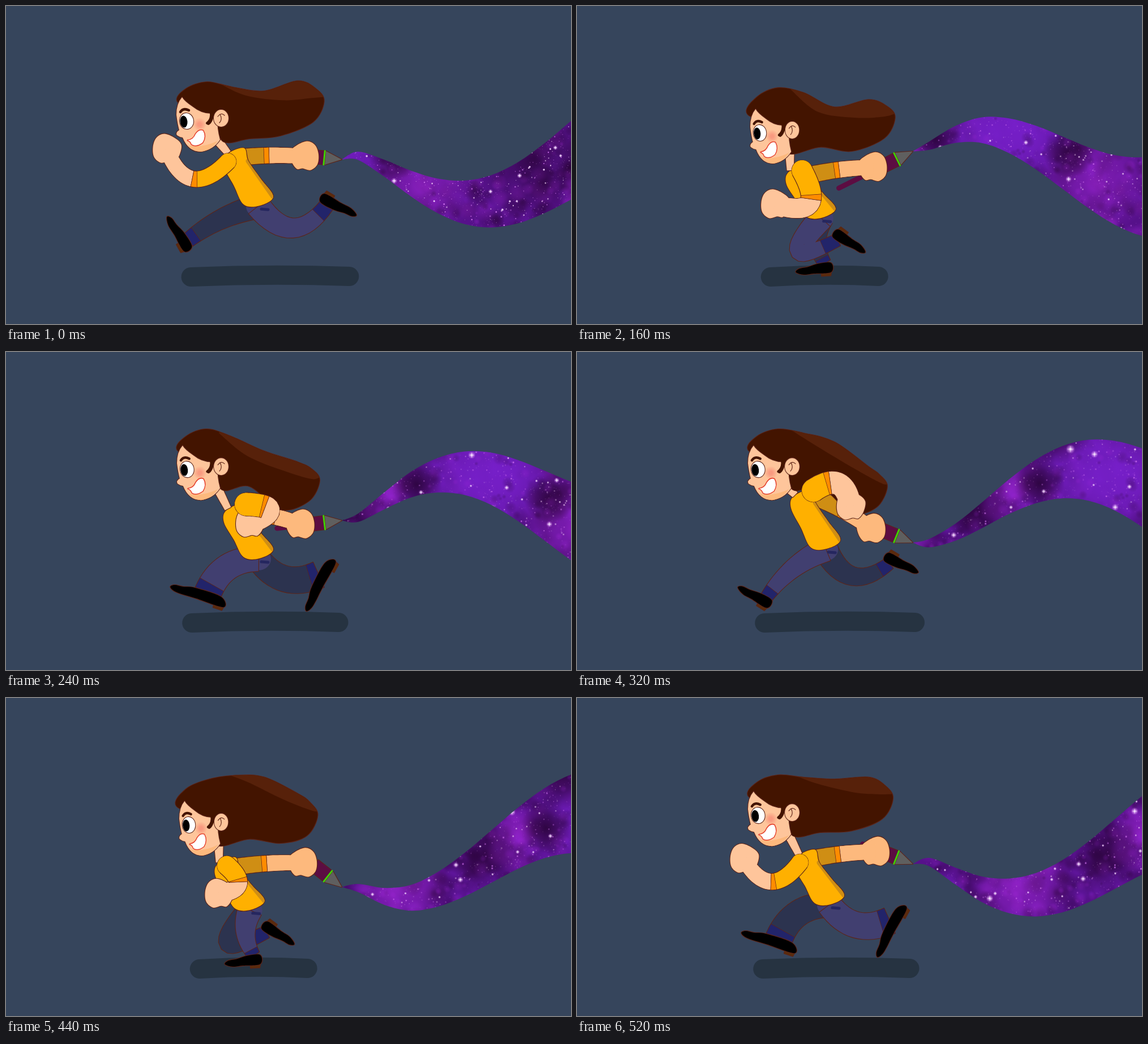
An HTML page with a canvas that plays this animation: 998 px wide and 561 px high, repeating every 560 ms.

```html
<!DOCTYPE html>
<html lang="en">
<head>
<meta charset="utf-8">
<title>Running with a galaxy pen</title>
<style>
html, body { margin: 0; width: 100%; height: 100%; overflow: hidden; background: #36455c; }
canvas { display: block; width: 100vw; height: 100vh; }
</style>
</head>
<body>
<canvas id="stage" width="998" height="561"></canvas>
<script>
const ctx = document.getElementById('stage').getContext('2d');
const STEP = 40, CYCLE = 14, STRIDE = CYCLE / 2, TAU = 2 * Math.PI;
const INK = '#5c2418', SKIN = '#fec59b', SKIN_DARK = '#fdb97d', SHIRT = '#ffb000',
  SHIRT_DARK = '#cf8e14', CUFF = '#ff8c00', HAIR = '#431400', SHINE = '#57210a',
  JEANS = '#413f70', JEANS_DARK = '#2c334f', HEM = '#22246a', HEEL = '#5a2c0c', PEN = '#5c0d42';

// Key poses of one leg: step, ankle x, ankle y, knee bend, foot angle in degrees.
const LEG_KEYS = [
  [0, 322, 413, 8, 241], [2, 348, 452, 12, 184], [4, 438, 454, 11, 177], [6, 552, 393, 22, 119],
  [7, 566, 352, 39, 31], [9, 537, 394, 33, 30], [11, 460, 413, 65, 37], [13, 357, 424, 18, 199],
  [14, 322, 413, 8, 241]];

const mix = (a, b, f) => a + (b - a) * f;
const wave = (k, peak, period = CYCLE) => Math.cos(TAU * (k - peak) / period);

// Catmull-Rom spline through flat x/y pairs.
function spline(pts, closed = true, path = new Path2D(), join = false) {
  const n = pts.length / 2;
  const at = i => {
    i = closed ? (i + n) % n : Math.max(0, Math.min(n - 1, i));
    return [pts[2 * i], pts[2 * i + 1]];
  };
  path[join ? 'lineTo' : 'moveTo'](...at(0));
  for (let i = 0; i < (closed ? n : n - 1); i++) {
    const [a, b, c, d] = [at(i - 1), at(i), at(i + 1), at(i + 2)];
    path.bezierCurveTo(b[0] + (c[0] - a[0]) / 6, b[1] + (c[1] - a[1]) / 6,
      c[0] - (d[0] - b[0]) / 6, c[1] - (d[1] - b[1]) / 6, c[0], c[1]);
  }
  return path;
}

function stroke(path, color, width) {
  ctx.strokeStyle = color;
  ctx.lineWidth = width;
  ctx.stroke(path);
}
function paint(path, fill, line = 2.2) {
  if (line) stroke(path, INK, line);
  ctx.fillStyle = fill;
  ctx.fill(path);
}
function oval(x, y, rx, ry, angle = 0) {
  const path = new Path2D();
  path.ellipse(x, y, rx, ry, angle, 0, TAU);
  return path;
}
function within(path, drawInside) {
  ctx.save();
  ctx.clip(path);
  drawInside();
  ctx.restore();
}

// Joints of a limb that bows sideways by `bend` between its ends.
function limb(sx, sy, ex, ey, bend) {
  const dx = ex - sx, dy = ey - sy, f = bend / Math.hypot(dx, dy);
  return [sx, sy, (sx + ex) / 2 - dy * f, (sy + ey) / 2 + dx * f, ex, ey];
}

// Tapered band along a curve that passes through three joints.
function tube([sx, sy, mx, my, ex, ey], w0, w1, t0 = 0, t1 = 1) {
  const cx = 2 * mx - (sx + ex) / 2, cy = 2 * my - (sy + ey) / 2;
  const path = new Path2D(), back = [];
  for (let i = 0; i <= 16; i++) {
    const t = mix(t0, t1, i / 16);
    const x = mix(mix(sx, cx, t), mix(cx, ex, t), t), y = mix(mix(sy, cy, t), mix(cy, ey, t), t);
    const dx = mix(cx - sx, ex - cx, t), dy = mix(cy - sy, ey - cy, t);
    const r = mix(w0, w1, t) / 2 / (Math.hypot(dx, dy) || 1);
    path.lineTo(x - dy * r, y + dx * r);
    back.unshift([x + dy * r, y - dx * r]);
  }
  back.forEach(p => path.lineTo(...p));
  path.closePath();
  return path;
}

function makeGalaxy() {
  const sky = document.createElement('canvas');
  sky.width = 1020;
  sky.height = 440;
  const g = sky.getContext('2d');
  let seed = 11;
  const rnd = (a = 0, b = 1) => mix(a, b, (seed = seed * 16807 % 2147483647) / 2147483647);
  const glow = (rgb, x, y, r, alpha) => {
    const fade = g.createRadialGradient(x, y, 0, x, y, r);
    fade.addColorStop(0, `rgba(${rgb},${alpha})`);
    fade.addColorStop(.5, `rgba(${rgb},${alpha * .65})`);
    fade.addColorStop(1, `rgba(${rgb},0)`);
    g.fillStyle = fade;
    g.fillRect(x - r, y - r, 2 * r, 2 * r);
  };
  const VIOLET = '120,32,204', PINK = '165,40,220', DARK = '36,2,46';
  g.fillStyle = '#56118a';
  g.fillRect(0, 0, 1020, 440);
  for (let i = 0; i < 900; i++)
    glow([VIOLET, DARK, DARK, PINK][i % 4], rnd(0, 1020), rnd(100, 420), rnd(5, 24), .3);
  glow(VIOLET, 550, 220, 130, .9);
  glow(VIOLET, 610, 225, 90, .8);
  glow(PINK, 190, 340, 90, .6);
  glow(PINK, 400, 245, 50, .6);
  glow(PINK, 735, 310, 100, .5);
  glow(DARK, 451, 238, 45, .8);
  glow(DARK, 685, 262, 45, .8);
  glow(DARK, 345, 280, 60, .6);
  glow(DARK, 480, 140, 65, .8);
  glow(DARK, 940, 270, 110, .5);
  for (let i = 0; i < 350; i++)
    glow(i % 2 ? DARK : PINK, rnd(0, 1020), rnd(100, 420), rnd(3, 12), .22);
  for (let i = 0; i < 4200; i++) {
    const s = .6 + rnd() ** 4 * 2;
    g.fillStyle = `rgba(${rnd() < .4 ? '255,225,255' : '215,120,245'},${rnd(.3, .9)})`;
    g.fillRect(rnd(0, 1020), rnd(100, 420), s, s);
  }
  for (let i = 0; i < 130; i++) {
    const x = rnd(0, 1020), y = rnd(110, 410), r = 1 + rnd() ** 3 * 3;
    glow('235,170,255', x, y, r * 2.2, .8);
    g.fillStyle = '#f6e6ff';
    g.fillRect(x - r / 2, y - r / 2, r, r);
    g.fillRect(x - r * 1.4, y - .4, r * 2.8, .8);
    g.fillRect(x - .4, y - r * 1.4, .8, r * 2.8);
  }
  return sky;
}
const galaxy = makeGalaxy();

// The trail is a wave that runs to the right and widens behind the pen.
function drawTrail(k, tip) {
  const top = [...tip], bottom = [...tip];
  for (let x = 622; x < 1050; x += 47) {
    const swing = Math.min(68, 58 + (x - 622) / 8) * wave(k, 4.1 + (x - 700) / 47);
    top.push(x, 284 - .22 * (x - 620) - swing);
    bottom.unshift(x, 298 + .11 * (x - 620) - swing);
  }
  // Pairs were put in front of the tip, so the tip already ends the lower edge.
  const path = spline(top, false);
  spline(bottom, false, path, true);
  within(path, () => ctx.drawImage(galaxy, 45.7 * k, -.8 * k));
}

function drawLeg(k, hip, color) {
  const i = LEG_KEYS.findIndex(key => key[0] > k), a = LEG_KEYS[i - 1], b = LEG_KEYS[i];
  const [, x, y, bend, angle] = a.map((v, j) => mix(v, b[j], (k - a[0]) / (b[0] - a[0])));
  const smear = Math.max(0, wave(k, 6, STRIDE)) ** 4;
  const half = 11 + 13 * smear, heel = -10 - 24 * smear, toe = heel + 62 + 38 * smear;
  const joints = limb(hip.x, hip.y + 6, x, y, bend);
  paint(tube(joints, 43, half * 2), color);
  paint(tube(joints, 43, half * 2, .88), HEM, 1.4);

  ctx.save();
  ctx.translate(x, y);
  ctx.rotate(angle * Math.PI / 180);
  ctx.scale(1, -1);
  paint(new Path2D(`M${heel - 1} 12h18v10h-16z`), HEEL);
  paint(spline([-half, 0, half, 0, (half + toe) / 2, 5, toe - 6, 7, toe, 13, toe - 14, 18,
    (heel + toe) / 2, 17, heel, 16]), '#000');
  ctx.restore();
}

function drawArm(joints, cuff, width, flip, skin, sleeve) {
  const [sx, sy, , , x, y] = joints;
  const band = (t0, t1) => tube(joints, width, width - 3, t0, t1);
  const shoulder = oval(sx, sy, width / 2, width / 2);
  const fist = [-26, -8, -14, -20, 4, -27, 18, -20, 24, -4, 22, 14, 10, 24, -4, 21, -14, 22, -23, 10];
  paint(band(0, 1), skin);
  paint(spline(fist.map((v, i) => i % 2 ? y + v : x + v * flip)), skin);
  paint(band(cuff, 1), skin, 0);
  paint(shoulder, sleeve, 1.6);
  paint(band(0, cuff), sleeve, 1.6);
  paint(shoulder, sleeve, 0);
  paint(band(cuff - .07, cuff), CUFF, 1.4);
}

function drawPen([x, y], angle, tail) {
  ctx.save();
  ctx.translate(x, y);
  ctx.rotate(angle);
  stroke(new Path2D(`M-50 0H${-tail}`), PEN, 9);
  paint(new Path2D('M-31 -12H-62V12H-31Z'), PEN);
  paint(new Path2D('M0 0L-29 -12V12Z'), '#5f5f5f');
  stroke(new Path2D('M-31 -12V12'), '#3fd000', 3);
  ctx.restore();
}

function drawTorso(neck, hip) {
  const chest = [neck.x - 7, neck.y + 24], waist = [hip.x - 26, hip.y + 3];
  const back = [neck.x + 36, neck.y + 14], seat = [hip.x + 26, hip.y - 11];
  const torso = spline([
    neck.x - 3, neck.y + 3, neck.x + 28, neck.y - 9, ...back,
    mix(back[0], seat[0], .5), mix(back[1], seat[1], .5), ...seat, hip.x + 2, hip.y + 5,
    ...waist, mix(chest[0], waist[0], .5), mix(chest[1], waist[1], .5), ...chest]);
  paint(torso, SHIRT);
  within(torso, () => stroke(spline([...back, ...seat], false), SHIRT_DARK, 9));
}

// The hair streams back: each part follows the head a little later.
function drawHair(k, bob) {
  const crown = 145 + 8 * wave(k, 4), middle = 159 + 20 * wave(k, 4.5), end = 167 + 36 * wave(k, 7.6);
  const tipX = 556 - 9 * wave(k, 9), tipY = 202 + 36 * wave(k, 7.8);
  const hair = spline([
    304 - bob / 8, 170 + bob, 318, 146 + bob * .7, 355, 134 + bob * .5, 400, crown, 455, middle, 515, end,
    tipX - 14, (end + tipY) / 2 - 4, tipX, tipY, tipX - 19, tipY + 36, 485, 256 + 28 * wave(k, 7.5),
    430, 234 + bob * .7, 384 - bob * .45, 239 + bob, 362, 195 + bob]);
  paint(hair, HAIR);
  const shine = spline([376, crown - 7, 425, middle + 8, 490, (middle + end) / 2 + 25, 540, end + 30,
    tipX + 3, tipY - 8], false);
  shine.lineTo(620, 80);
  shine.lineTo(400, 80);
  within(hair, () => paint(shine, SHINE, 0));
}

function drawFace(bob) {
  ctx.save();
  ctx.translate(340 + bob / 8, bob);
  ctx.scale(1 - bob * .003, 1);
  ctx.translate(-340, 0);
  paint(new Path2D('M311 161Q301 172 301 192Q303 208 306 219Q299 223 302 228Q306 231 312 232Q322 257 344 257' +
    'Q366 254 378 236Q372 214 374 200L362 190Q345 190 330 178Q315 168 311 161Z'), SKIN);
  paint(new Path2D('M322 246Q346 251 374 238Q362 255 344 257Q330 256 322 246Z'), SKIN_DARK, 0);
  const blush = ctx.createRadialGradient(342, 209, 3, 342, 209, 12);
  blush.addColorStop(0, 'rgba(248,150,125,.9)');
  blush.addColorStop(1, 'rgba(248,150,125,0)');
  paint(oval(342, 209, 12, 12), blush, 0);
  paint(new Path2D('M368 185Q367 205 358 210Q349 208 356 203Q361 198 360 188Z'), HAIR, 0);
  paint(oval(380, 198, 13, 15), SKIN);
  stroke(new Path2D('M374 195Q380 187 386 193M378 191Q383 200 377 206'), INK, 1.2);
  stroke(new Path2D('M308 187Q313 179 323 184'), HAIR, 4.5);
  paint(oval(319, 203, 12, 14, -.15), '#fff');
  paint(oval(314, 204, 6.5, 10.5, -.1), '#000', 0);
  const mouth = new Path2D('M321 237Q331 236 335 226Q341 217 348 220Q354 230 347 241Q336 249 328 244Q326 238 321 237Z');
  stroke(mouth, '#e5402c', 3);
  paint(mouth, '#fff', 0);
  ctx.restore();
}

function draw(k) {
  const swing = wave(k, 0), bob = 11 * (1 - wave(k, 0, STRIDE));
  const lean = 10 * wave(k, 6.5, STRIDE), drop = wave(k, 4.5, STRIDE);
  const neck = { x: 383 + lean, y: 272 + 20 * drop };
  const hip = { x: 437 + lean, y: 356 + 14 * drop };
  const tip = [593, 295 - 51 * wave(k, 2.4)];

  ctx.fillStyle = '#36455c';
  ctx.fillRect(0, 0, 998, 561);
  ctx.lineCap = ctx.lineJoin = 'round';

  drawTrail(k, tip);
  const middle = 452 + 15 * wave(k, .3, STRIDE), reach = 117 + 23 * wave(k, .1, STRIDE);
  stroke(new Path2D(`M${middle - reach} 478Q${middle} 472 ${middle + reach} 477`), '#263341', 34);

  drawLeg(k, hip, JEANS_DARK);
  const farX = 524 + 4 * swing, farY = 288 - 24 * wave(k, .8);
  drawPen(tip, 1.2 * Math.atan2(tip[1] - farY, tip[0] - farX), 105 + 45 * wave(k, 3));
  drawArm(limb(neck.x + 32 - 14 * swing, neck.y + 8, farX, farY, -3), .46, 29, 1, SKIN_DARK, SHIRT_DARK);

  paint(oval(hip.x, hip.y + 6, 22, 20), JEANS, 0);
  drawLeg((k + STRIDE) % CYCLE, hip, JEANS);
  stroke(new Path2D(`M${hip.x + 5} ${hip.y + 11}l12 1`), '#25265f', 5);

  drawTorso(neck, hip);
  paint(tube(limb(373 + bob / 8, 236 + bob, neck.x, neck.y, 0), 16, 12), SKIN);
  drawHair(k, bob);
  drawFace(bob);

  const nearX = 372 - 98 * wave(k, .8) + 15 * wave(k, 1.5, STRIDE);
  const nearY = 303 + 45 * wave(k, 4, STRIDE) - 10 * swing;
  const arm = limb(neck.x + 17 - 17 * swing, neck.y + 3 + 12 * swing, nearX, nearY, -37 - 12 * wave(k, 2.5));
  drawArm(arm, .4 + .1 * swing, 35 - 6 * swing, -1, SKIN, SHIRT);
}

function tick() {
  draw(Math.floor(performance.now() / STEP) % CYCLE);
  requestAnimationFrame(tick);
}
tick();
</script>
</body>
</html>
```
